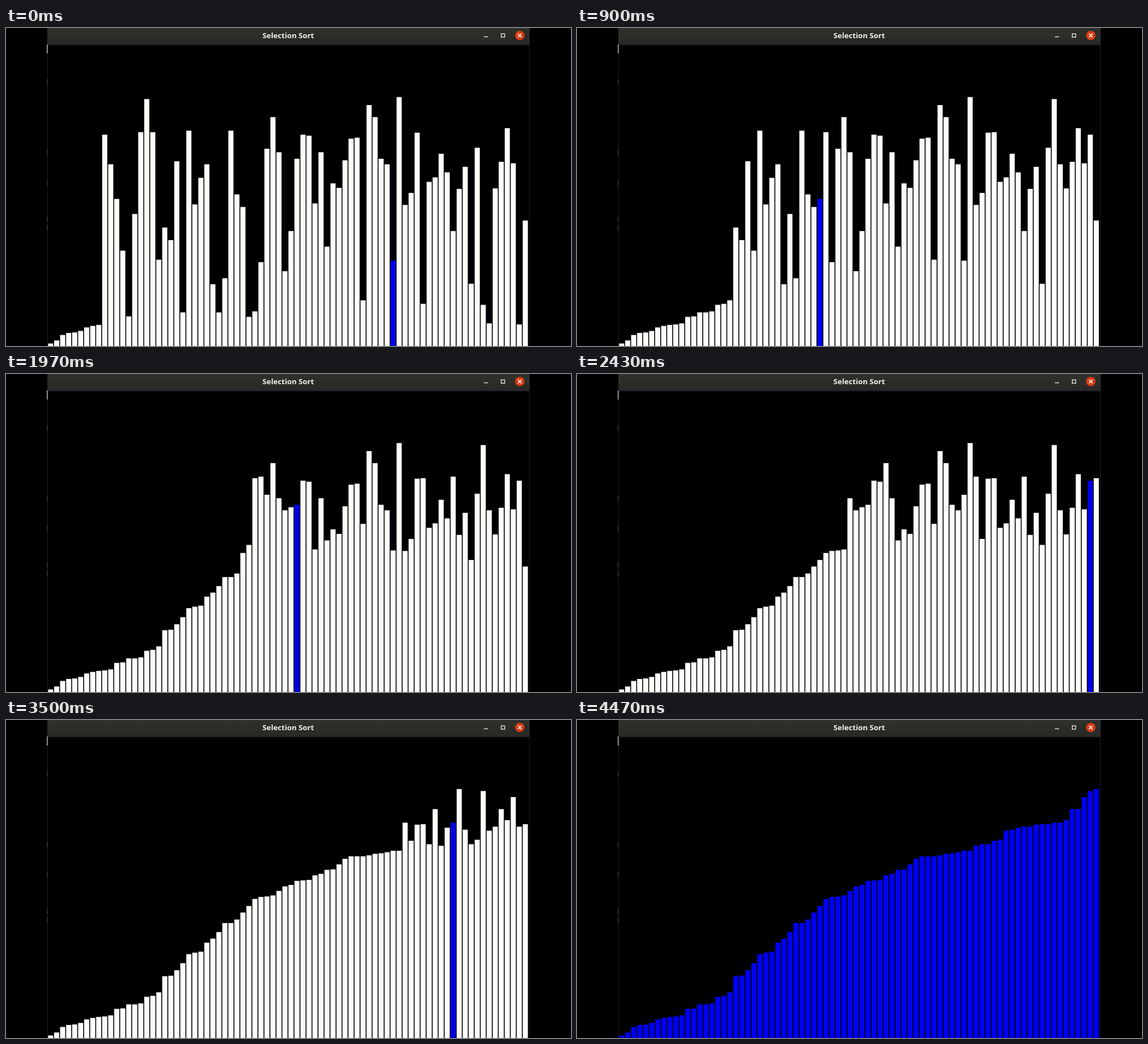
Write an HTML page with a canvas that moves like this. It is 998 px wide and 561 px high and loops after 4660 ms.

```html
<!DOCTYPE html>
<html lang="en">
<head>
<meta charset="utf-8">
<title>Selection Sort</title>
<style>
html, body { margin: 0; width: 100%; height: 100%; overflow: hidden; background: #000; }
canvas { display: block; }
</style>
</head>
<body>
<canvas id="stage" width="998" height="561"></canvas>
<script>
const ctx = document.getElementById('stage').getContext('2d');
const LOOP = 4660, TICK = 100 / 3, SORTED_AT = 4055;
const COUNT = 80, LAST = COUNT - 1, MAX_VALUE = 500, PASS_PAUSE = 10;
const BAR_X = 74.35, PITCH = 10.613, BAR_W = 9, FLOOR = 561, UNIT = 0.8855;

// Additive feedback generator, the same as C's rand() in glibc.
function randomValues(seed, count) {
  const warmup = 344, r = [seed];
  for (let i = 1; i < warmup + count; i++) {
    if (i < 31) r[i] = 16807 * r[i - 1] % 2147483647;
    else if (i < 34) r[i] = r[i - 31];
    else r[i] = (r[i - 3] + r[i - 31]) >>> 0;
  }
  return r.slice(warmup).map(v => (v >>> 1) % MAX_VALUE);
}

// Array state at the start of every selection pass.
const sorted = randomValues(1, COUNT);
const passes = sorted.map((_, i) => {
  const before = sorted.slice();
  let min = i;
  for (let j = i + 1; j < COUNT; j++) if (sorted[j] < sorted[min]) min = j;
  [sorted[i], sorted[min]] = [sorted[min], sorted[i]];
  return before;
});

// Work done before pass i compares index j, with a pause after each pass.
const cost = (i, j) => i * (LAST + PASS_PAUSE) - i * (i - 1) / 2 + j - i;

// Key points of the sort's pace: time, work done.
const pace = [
  [0, cost(9, 57)], [900, cost(19, 33)], [1500, cost(26, 40)],
  [2433, cost(38, 78)], [2967, cost(47, 68)], [3500, cost(59, 67)],
  [SORTED_AT, cost(LAST, LAST)]
];

function sortState(time) {
  const k = Math.max(1, pace.findIndex(p => p[0] >= time - 1));
  const [t0, c0] = pace[k - 1], [t1, c1] = pace[k];
  const work = Math.round(c0 + (c1 - c0) * (time - t0) / (t1 - t0));
  let i = 0;
  while (i < LAST && cost(i + 1, i + 1) <= work) i++;
  return { values: passes[i], cursor: Math.min(LAST, i + work - cost(i, i)) };
}

function rect(color, x, y, w, h) {
  ctx.fillStyle = color;
  ctx.fillRect(x, y, w, h);
}

function line(color, width, ...segments) {
  ctx.strokeStyle = color;
  ctx.lineWidth = width;
  ctx.beginPath();
  for (const [x1, y1, x2, y2] of segments) {
    ctx.moveTo(x1, y1);
    ctx.lineTo(x2, y2);
  }
  ctx.stroke();
}

function drawWindow() {
  rect('#000', 0, 0, 998, 561);
  const bar = ctx.createLinearGradient(0, 0, 0, 30);
  bar.addColorStop(0, '#30302d');
  bar.addColorStop(1, '#282825');
  rect(bar, 73, 0, 852, 29);
  rect('#1b1f2b', 73, 29, 852, 1.5);
  rect('#1c1c1c', 73, 30, 1, 531);
  rect('#1e1e20', 924, 30, 1, 531);
  rect('#b4b4b4', 72, 29, 1.5, 16);
  for (const y of [90, 215, 268, 332, 347]) rect('#30303a', 72, y, 1.5, 10);

  ctx.fillStyle = '#f2f2ee';
  ctx.font = 'bold 13.2px "Noto Sans", "Open Sans", sans-serif';
  ctx.textAlign = 'center';
  ctx.fillText('Selection Sort', 498.5, 18.3);

  line('#e6e6e2', 1.4, [844, 15.5, 851.5, 15.5]);
  ctx.strokeRect(874.8, 10.3, 6, 6);
  ctx.fillStyle = '#d73c14';
  ctx.beginPath();
  ctx.arc(907.5, 13.2, 8.3, 0, Math.PI * 2);
  ctx.fill();
  line('#fff', 1.5, [904.3, 10, 910.7, 16.4], [910.7, 10, 904.3, 16.4]);
}

function draw(now) {
  const time = Math.floor((now % LOOP + 4) / TICK) * TICK;
  const done = time >= SORTED_AT;
  const { values, cursor } = done ? { values: sorted } : sortState(time);
  drawWindow();
  values.forEach((value, n) => {
    const color = done || n === cursor ? '#0000ee' : '#fdfdfa';
    const height = value * UNIT;
    rect(color, BAR_X + n * PITCH, FLOOR - height, BAR_W, height);
  });
}

const start = performance.now();
function loop() {
  draw(performance.now() - start);
  requestAnimationFrame(loop);
}
loop();
</script>
</body>
</html>
```
